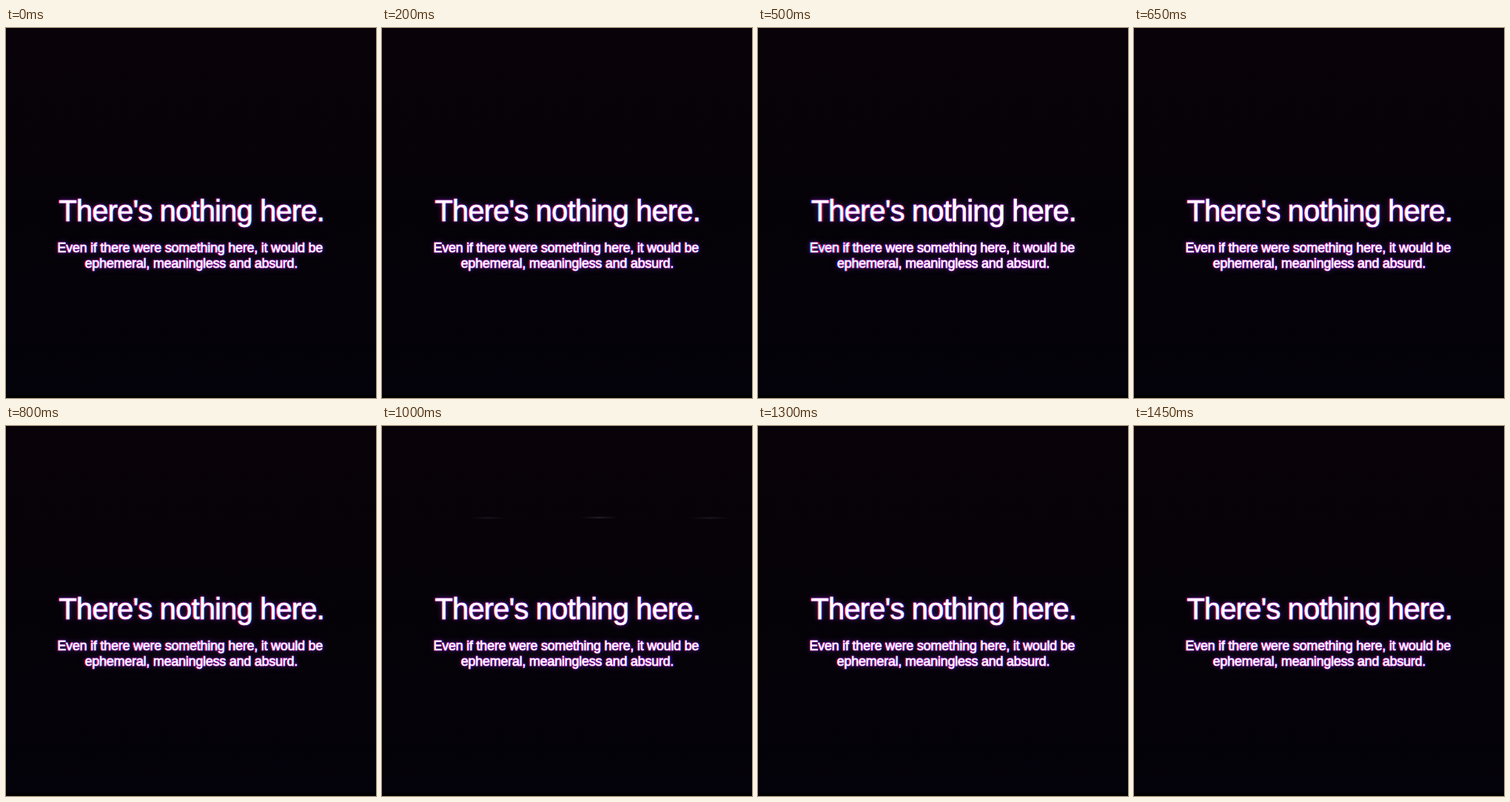
An HTML page that plays this animation: 500x500 px, repeating every 1500 ms.

```html
<!DOCTYPE html>
<html lang="en">
<head>
<meta charset="utf-8">
<title>There's nothing here.</title>
<style>
  html, body { margin: 0; width: 100%; height: 100%; overflow: hidden; background: #050208; }
  svg { display: block; width: 500px; height: 500px; isolation: isolate; }
  text { font-family: "Liberation Sans", Arial, sans-serif; }
  .title { font-size: 40px; letter-spacing: -.86px; }
  .line { font-size: 18px; letter-spacing: -.25px; }
  .channel { mix-blend-mode: screen; stroke-linejoin: round; }
  #red { fill: #ff0018; stroke: #ff0018; stroke-width: 1.1px; }
  #green { fill: #00ff00; stroke: #00ff00; stroke-width: .6px; }
  #blue { fill: #0000ff; stroke: #0000ff; stroke-width: 1.1px; }
  #rim { fill: #8c2ab0; stroke: #8c2ab0; stroke-width: 1.6px; opacity: .6; filter: url(#tight); }
  #glow { fill: #5c2c9c; stroke: #5c2c9c; stroke-width: 1px; filter: url(#wide); }
</style>
</head>
<body>
<svg viewBox="0 0 500 500">
  <defs>
    <filter id="tight" x="-10%" y="-30%" width="120%" height="160%">
      <feGaussianBlur stdDeviation="1.3"/>
    </filter>
    <filter id="wide" x="-10%" y="-30%" width="120%" height="160%">
      <feGaussianBlur stdDeviation="4"/>
    </filter>
    <linearGradient id="tint" x2="0" y2="1">
      <stop offset="0" stop-color="#090309"/>
      <stop offset=".5" stop-color="#050207"/>
      <stop offset="1" stop-color="#04020a"/>
    </linearGradient>
    <linearGradient id="fade">
      <stop offset="0" stop-color="#3a3044" stop-opacity="0"/>
      <stop offset=".5" stop-color="#3a3044" stop-opacity=".5"/>
      <stop offset="1" stop-color="#3a3044" stop-opacity="0"/>
    </linearGradient>
    <g id="words">
      <text class="title" x="71.5" y="260.6">There's nothing here.</text>
      <text class="line" x="69.6" y="303">Even if there were something here, it would be</text>
      <text class="line" x="106.7" y="324">ephemeral, meaningless and absurd.</text>
    </g>
  </defs>
  <rect width="500" height="500" fill="url(#tint)"/>
  <rect y="496" width="500" height="4" fill="#000"/>
  <g id="streaks" fill="url(#fade)">
    <rect x="118" y="123" width="50" height="2.5" opacity=".6"/>
    <rect x="268" y="122.5" width="50" height="2.5"/>
    <rect x="416" y="123" width="54" height="2.5" opacity=".7"/>
  </g>
  <g id="copy">
    <use id="glow" href="#words"/>
    <use id="rim" href="#words"/>
    <use class="channel" id="red" href="#words"/>
    <use class="channel" id="green" href="#words"/>
    <use class="channel" id="blue" href="#words"/>
  </g>
</svg>
<script>
const STEP = 50, STEPS = 30, GLITCH = 10, STREAK = 20;
const $ = id => document.getElementById(id);
const noise = n => { const v = Math.sin(n * 127.1 + 3.7) * 43758.5453; return v - Math.floor(v); };

const shift = (id, x, scale = 1) =>
  $(id).setAttribute('transform', `translate(${x} 0) scale(${scale} 1)`);

function draw(step) {
  const glitch = step === GLITCH;
  const wobble = (noise(step) - .5) * .4;
  // During the glitch the red layer narrows, so its fringe flips on the left
  if (glitch) shift('red', 1.8, .994);
  else shift('red', -.7 + wobble);
  shift('blue', glitch ? -.6 : .4 + wobble);
  $('glow').setAttribute('opacity', .5 + .12 * noise(step + 50));
  $('copy').setAttribute('transform', `translate(0 ${step % 4 === 3 ? 1 : 0})`);
  $('streaks').setAttribute('visibility', step === STREAK ? 'visible' : 'hidden');
}

let last = -1;
function tick() {
  const step = Math.floor(performance.now() / STEP) % STEPS;
  if (step !== last) draw(last = step);
  requestAnimationFrame(tick);
}
tick();
</script>
</body>
</html>
```
